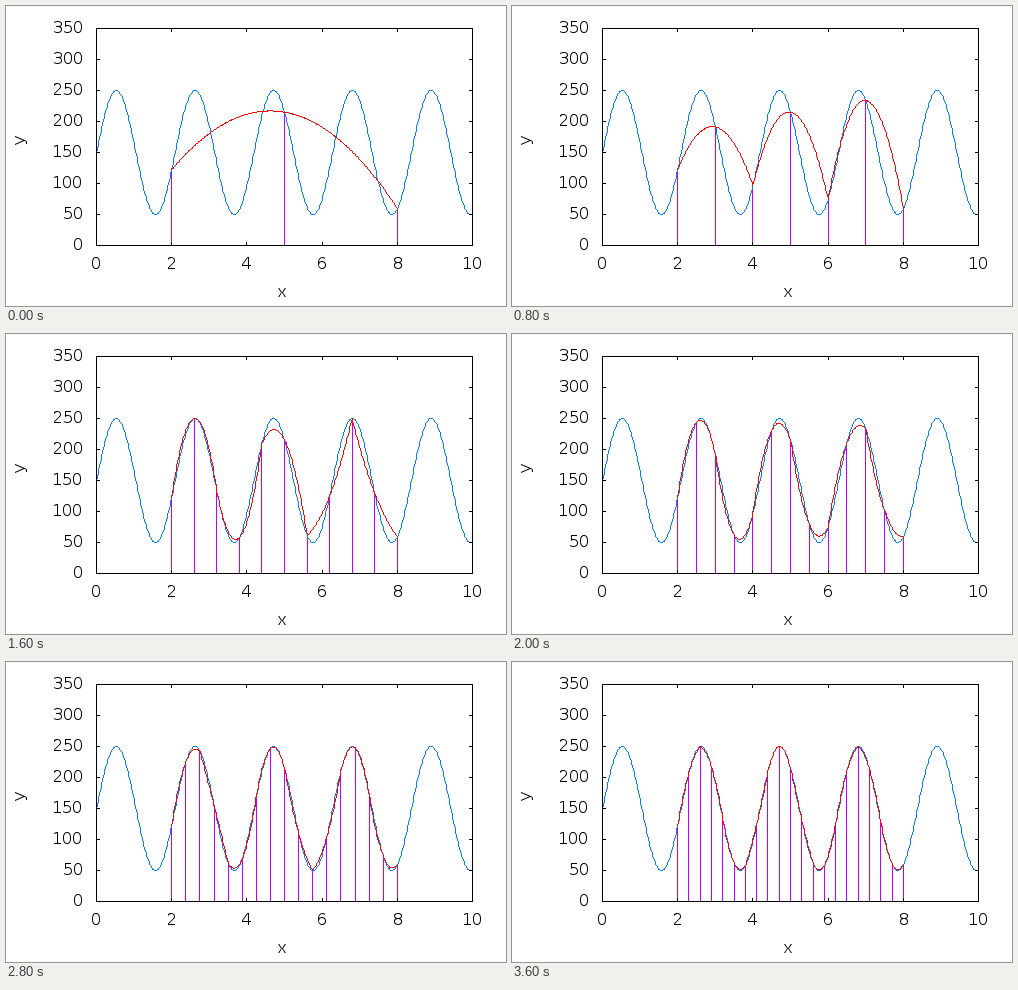
A matplotlib script for the animation above (4000 ms loop, 500 by 300 pixels).

```python
import numpy as np
import matplotlib.pyplot as plt
from matplotlib.animation import FuncAnimation

W, H = 500, 300
LEFT, RIGHT, TOP, BOTTOM = 90, 466, 22, 239
A, B = 2, 8          # integration interval
FRAMES = 10          # one more parabola in each step
TICK = 3
BLACK, BLUE, RED, PURPLE = (0, 0, 0), (0, 128, 255), (255, 0, 0), (192, 0, 255)

plt.rcParams["font.family"] = "DejaVu Sans"
plt.rcParams["text.hinting"] = "native"
plt.rcParams["text.hinting_factor"] = 1

fig = plt.figure(figsize=(W / 100, H / 100), dpi=100, facecolor="white")
ax = fig.add_axes([0, 0, 1, 1])


def f(x):
    return 100 * np.sin(3 * x) + 150


def nearest(v):
    return np.floor(np.asarray(v) + 0.5).astype(int)


def px(x):
    return nearest(LEFT + np.asarray(x) * (RIGHT - LEFT) / 10)


def py(y):
    return nearest(BOTTOM - np.asarray(y) * (BOTTOM - TOP) / 350)


def line(img, xs, ys, color):
    """Crisp polyline, one pixel wide, through whole-pixel points."""
    for xa, ya, xb, yb in zip(xs[:-1], ys[:-1], xs[1:], ys[1:]):
        n = max(abs(xb - xa), abs(yb - ya)) + 1
        img[nearest(np.linspace(ya, yb, n)),
            nearest(np.linspace(xa, xb, n))] = color


def label(x, y, text, **kw):
    ax.text(x, y, text, fontsize=11.52, color="black", va="baseline", **kw)


def simpson(x, n):
    """Parabolas through the ends and the middle of n equal panels."""
    w = (B - A) / n
    i = np.clip(np.floor((x - A) / w + 1e-9), 0, n - 1)
    start = A + i * w
    t = (x - start) / w
    y0, y1, y2 = f(start), f(start + w / 2), f(start + w)
    return (y0 * (1 - t) * (1 - 2 * t) + 4 * y1 * t * (1 - t)
            + y2 * t * (2 * t - 1))


def draw_frame(img):
    line(img, [LEFT, RIGHT, RIGHT, LEFT, LEFT],
         [TOP, TOP, BOTTOM, BOTTOM, TOP], BLACK)
    for x in px(range(0, 11, 2)):
        line(img, [x, x], [BOTTOM, BOTTOM - TICK], BLACK)
        line(img, [x, x], [TOP, TOP + TICK], BLACK)
    for y in py(range(0, 351, 50)):
        line(img, [LEFT, LEFT + TICK], [y, y], BLACK)
        line(img, [RIGHT, RIGHT - TICK], [y, y], BLACK)


def render(n):
    img = np.full((H, W, 3), 255, np.uint8)
    for node in np.linspace(A, B, 2 * n + 1):
        x = px(node)
        line(img, [x, x], [BOTTOM, py(f(node))], PURPLE)
    xs = np.linspace(0, 10, 501)
    line(img, px(xs), py(f(xs)), BLUE)
    xs = np.linspace(A, B, 301)
    line(img, px(xs), py(simpson(xs, n)), RED)
    draw_frame(img)
    return img


plot = ax.imshow(render(1), extent=(0, W, H, 0), interpolation="nearest",
                 aspect="auto")
ax.axis("off")

for v in range(0, 11, 2):
    label(px(v) + 0.5, 263, str(v), ha="center")
for v in range(0, 351, 50):
    label(76.5, py(v) + 5, str(v), ha="right")
label(276.5, 291, "x", ha="center")
label(19, 133, "y", ha="center", rotation=90, rotation_mode="anchor")


def draw(k):
    plot.set_data(render(k % FRAMES + 1))
    return [plot]


anim = FuncAnimation(fig, draw, frames=FRAMES, interval=400,
                     repeat=True, repeat_delay=0, blit=False)
plt.show()
```
